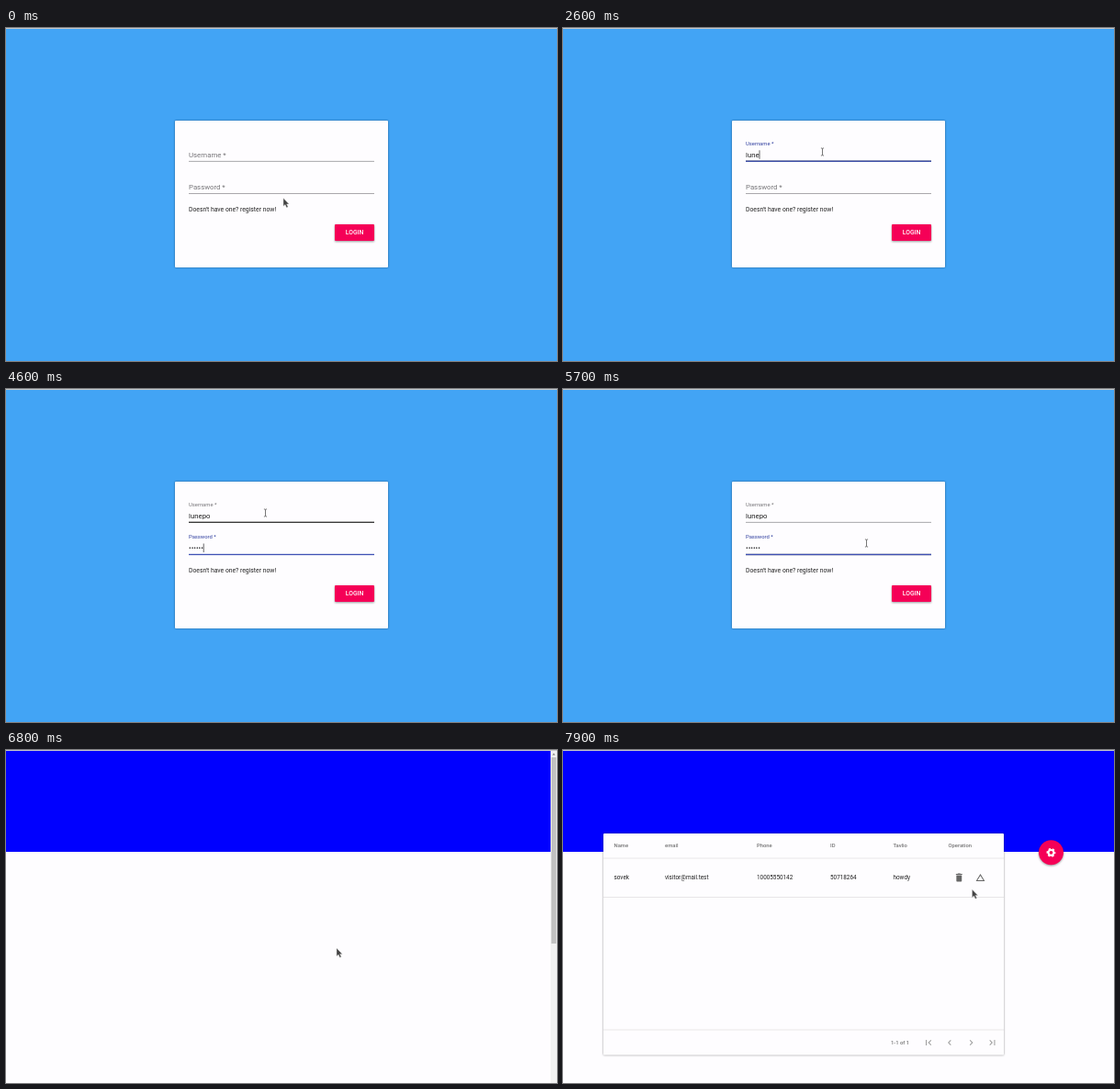
These frames come from a looping animation (600 px wide and 363 px high, 8000 ms). An HTML page:

```html
<!DOCTYPE html>
<html lang="en">
<head>
<meta charset="utf-8">
<title>Login demo</title>
<style>
  html, body { margin: 0; height: 100%; overflow: hidden; }
  svg { display: block; width: 100%; height: 100%; }
  text { font-family: Roboto, Arial, sans-serif; fill: #212121; white-space: pre; }
  .paper { fill: #fefdff; filter: drop-shadow(0 .6px .8px rgba(0,0,0,.45)); }
  .input { font-size: 7.8px; }
  .small { font-size: 6.8px; }
  .head { font-size: 5.85px; font-weight: 500; fill: #757575; }
  .cell { font-size: 6.35px; }
  .rule { stroke: #e2e1e3; stroke-width: .8; }
  .raised { filter: drop-shadow(0 1px 1px rgba(0,0,0,.4)); }
</style>
</head>
<body>
<svg viewBox="0 0 600 363">
  <defs>
    <clipPath id="btnClip"><rect x="358" y="214" width="43" height="18" rx="1"/></clipPath>
    <path id="trash" d="M6 19c0 1.1.9 2 2 2h8c1.1 0 2-.9 2-2V7H6zM19 4h-3.5l-1-1h-5l-1 1H5v2h14z"/>
    <path id="delta" d="M12 7.77L18.39 18H5.61L12 7.77M12 4L2 20h20z"/>
    <path id="chevron" d="M15.41 7.41L14 6l-6 6 6 6 1.41-1.41L10.83 12z"/>
    <path id="first" d="M18.41 16.59L13.82 12l4.59-4.59L17 6l-6 6 6 6zM6 6h2v12H6z"/>
  </defs>

  <g id="login">
    <rect width="600" height="363" fill="#42a4f5"/>
    <rect class="paper" x="184" y="101" width="232" height="160" rx="1"/>
    <g id="fields"></g>
    <text class="small" x="199" y="199.8">Doesn't have one? register now!</text>
    <rect id="btn" class="raised" x="358" y="214" width="43" height="18" rx="1"/>
    <circle id="ripple" cx="360" cy="216" fill="#fff" opacity=".2" clip-path="url(#btnClip)"/>
    <text class="small" x="379.5" y="225.2" text-anchor="middle" font-weight="500" style="fill:#fff">LOGIN</text>
  </g>

  <g id="home">
    <rect width="600" height="363" fill="#fefdff"/>
    <rect width="600" height="111" fill="#00f"/>
    <g id="table">
      <rect class="paper" x="44" y="91" width="436" height="241.5" rx="1"/>
      <path class="rule" d="M44 118H480M44 160.5H480M44 305H480"/>
      <text class="head" x="357" y="321" font-weight="400">1-1 of 1</text>
    </g>
    <g id="fab">
      <circle class="raised" r="13.5" fill="#f50057"/>
      <g fill="none" stroke="#fff">
        <circle r="2.9" stroke-width="2"/>
        <circle r="4.2" stroke-width="1.5" stroke-dasharray="2.4 1.998" stroke-dashoffset="1.2"/>
      </g>
    </g>
    <g id="bar">
      <rect x="593" width="7" height="363" fill="#f1f1f1"/>
      <path d="M595 5.5L596.5 3.5 598 5.5z" fill="#777"/>
      <rect id="thumb" x="593.8" y="8" width="5.4" fill="#c1c1c1"/>
    </g>
  </g>

  <rect width="600" height="1" fill="#c6c7c8"/>
  <g id="cursor">
    <path id="arrow" d="M0 0V8.7L2 7 3.5 10.2 5.1 9.4 3.6 6.4H6.2Z" fill="#444" stroke="#ddd" stroke-width=".4"/>
    <path id="beam" d="M-1.6-4H-.4L0-3.6.4-4H1.6M0-3.6V3.6M-1.6 4H-.4L0 3.6.4 4H1.6" fill="none" stroke="#555" stroke-width=".8"/>
    <path id="hand" d="M-.8.2Q0-1 .9.2V3.6L4.6 4.3Q5.8 4.6 5.7 6L5 10H.2L-2.6 6.4Q-2.8 5-1.8 5.2L-.8 6Z" fill="#444" stroke="#ddd" stroke-width=".5"/>
  </g>
</svg>
<script>
const $ = id => document.getElementById(id);
let t = 0;
const ramp = (a, b) => Math.min(1, Math.max(0, (t - a) / (b - a)));
const ease = p => 1 - (1 - p) ** 3;
const mix = (a, b, p) => a + (b - a) * p;
const within = (a, b) => t >= a && t < b;
const show = (el, on) => el.setAttribute('display', on ? 'inline' : 'none');

function add(parent, tag, attrs, text = '') {
  const el = document.createElementNS('http://www.w3.org/2000/svg', tag);
  set(el, attrs);
  el.textContent = text;
  return parent.appendChild(el);
}
function set(el, attrs) {
  for (const k in attrs) el.setAttribute(k, attrs[k]);
}

// y is the underline; times are the moments at which each character lands
const fields = [
  { name: 'Username *', value: 'lunepo', y: 145.3, focus: 800, blur: 3300,
    times: [2100, 2300, 2500, 2600, 2800, 3000], caretOn: [[800, 1400], [2000, 3300]] },
  { name: 'Password *', value: '••••••', y: 180.5, focus: 3300, blur: 6500,
    times: [3700, 3800, 4100, 4300, 4400, 4600], caretOn: [[3300, 5200]] }
];
for (const f of fields) {
  const g = $('fields');
  f.line = add(g, 'rect', { x: 199, width: 202 });
  f.active = add(g, 'rect', { y: f.y - .7, height: 1.3, fill: '#3f51b5' });
  f.label = add(g, 'text', { x: 199 }, f.name);
  f.text = add(g, 'text', { x: 199, y: f.y - 4.8, class: 'input' });
  f.caret = add(g, 'rect', { y: f.y - 12, width: .7, height: 9.5, fill: '#222' });
}

const columns = [
  [55.5, 'Name', 'sovek'], [111, 'email', 'visitor@mail.test'], [211, 'Phone', '10005550142'],
  [291, 'ID', '50718264'], [359.5, 'Tavlio', 'howdy'], [419.5, 'Operation', '']
];
for (const [x, head, cell] of columns) {
  add($('table'), 'text', { x, y: 106, class: 'head' }, head);
  add($('table'), 'text', { x, y: 141.3, class: 'cell' }, cell);
}
function icon(id, x, y, fill, flip = 1) {
  add($('table'), 'use', { href: '#' + id, fill,
    transform: `translate(${x} ${y}) scale(${.49 * flip} .49) translate(-12 -12)` });
}
icon('trash', 431.3, 139, '#666');
icon('delta', 454.5, 139, '#666');
icon('first', 398, 319, '#999');
icon('chevron', 421, 319, '#999');
icon('chevron', 444.5, 319, '#999', -1);
icon('first', 467.5, 319, '#999', -1);

// time, x, y of the pointer's hot spot
const path = [
  [0, 302, 185.5], [500, 282.5, 135], [5100, 282.5, 135], [5300, 291, 78], [5500, 311, 115],
  [5700, 330.5, 168], [6000, 360, 216], [7400, 360, 216], [7900, 445.5, 152], [8000, 445.5, 152]
];
function pointer() {
  const i = path.findIndex(k => k[0] > t);
  const [a, b] = [path[i - 1], path[i]], p = ramp(a[0], b[0]);
  return [mix(a[1], b[1], p), mix(a[2], b[2], p)];
}

function drawField(f, [px, py]) {
  const over = px > 199 && px < 401 && py > f.y - 17 && py < f.y + 1;
  const focused = within(f.focus, f.blur);
  const up = ease(ramp(f.focus - 100, f.focus + 200));
  const grow = up * (1 - ease(ramp(f.blur - 100, f.blur + 200)));
  const count = f.times.filter(s => s <= t).length;
  const h = over ? 1.3 : .8;
  set(f.line, { y: f.y - h / 2, height: h, fill: over ? '#303030' : '#959497' });
  set(f.active, { x: 300 - 101 * grow, width: 202 * grow });
  set(f.label, { y: mix(f.y - 4.8, f.y - 17.3, up) });
  f.label.style.fontSize = mix(7.8, 5.85, up) + 'px';
  f.label.style.fill = focused ? '#303f9f' : '#767578';
  f.text.textContent = f.value.slice(0, count);
  set(f.caret, { x: 199 + (count ? f.text.getComputedTextLength() : 0) });
  show(f.caret, f.caretOn.some(s => within(...s)));
  return over;
}

function draw(now) {
  t = Math.floor(now % 8000 / 100) * 100;
  const home = t >= 6800, at = pointer();
  show($('login'), !home);
  show($('home'), home);

  const inField = fields.map(f => drawField(f, at)).some(Boolean) && !home;
  const onButton = within(6000, 6800);
  const hover = ramp(5900, 6200);
  set($('btn'), { fill: `rgb(${mix(245, 197, hover)} ${mix(0, 17, hover)} ${mix(87, 98, hover)})` });
  set($('ripple'), { r: t < 6500 ? 0 : mix(12, 38, ramp(6500, 6700)) });

  // the table slides up from below; the page scrolls until it fits
  const drop = 288 * (1 - ease(ramp(7000, 7300))), scrolls = drop > 31;
  set($('table'), { transform: `translate(${scrolls ? -3.5 : 0} ${drop})` });
  show($('bar'), scrolls);
  set($('thumb'), { height: 203 * 620 / (332 + drop) });
  set($('fab'), { transform: `translate(531.5 111.8) scale(${ease(ramp(7200, 7600))})` });

  set($('cursor'), { transform: `translate(${at})` });
  show($('beam'), inField);
  show($('hand'), onButton);
  show($('arrow'), !inField && !onButton);
}

let start;
function tick(now) {
  start ??= now;
  draw(now - start);
  requestAnimationFrame(tick);
}
draw(0);
requestAnimationFrame(tick);
</script>
</body>
</html>
```
